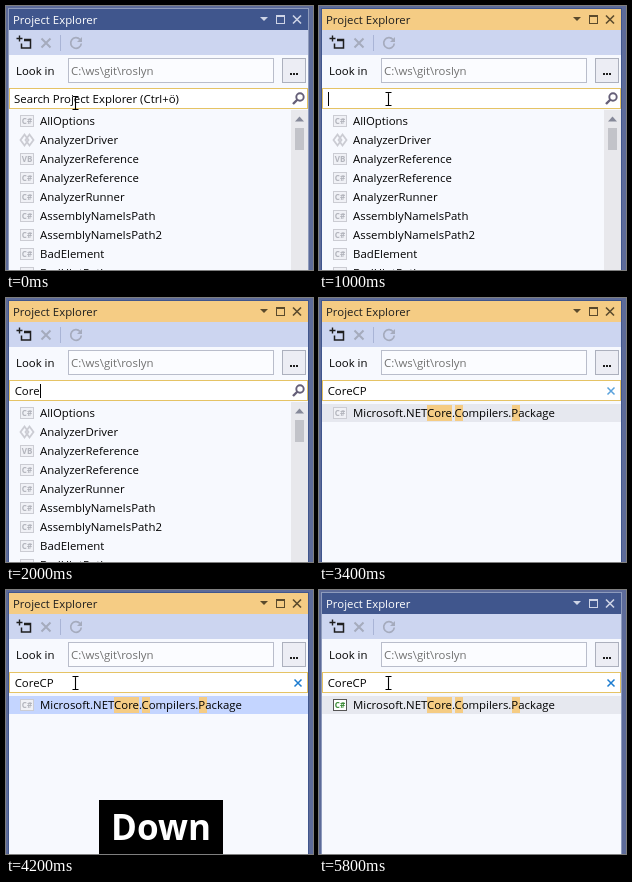
An HTML page for the animation above (6.8 s loop, 307 px wide and 264 px high).

```html
<!DOCTYPE html>
<html lang="en">
<head>
<meta charset="utf-8">
<title>Project Explorer search</title>
<style>
  html, body { margin: 0; width: 100%; height: 100%; overflow: hidden; background: #5d6b99; }
  svg { display: block; width: 100vw; height: 100vh; }
  text { font: 11.4px "Open Sans", "Noto Sans", sans-serif; fill: #000; white-space: pre; }
  .key { font-size: 35px; font-weight: 700; fill: #fff; text-anchor: middle; }
  .tag { font-size: 8px; font-weight: 700; text-anchor: middle; }
  .muted { fill: #717171; }
  .line { fill: none; stroke: #1e1e1e; }
  .off { stroke: #a5abbd; }
  .crisp { shape-rendering: crispEdges; }
</style>
</head>
<body>
<svg viewBox="0 0 307 264">
  <rect width="307" height="264" fill="#5d6b99"/>
  <rect id="frame" class="crisp" x="2" y="2" width="301" height="270"/>
  <rect id="title" class="crisp" x="3" y="3" width="299" height="21"/>
  <text id="caption" x="7" y="18">Project Explorer</text>
  <g id="buttons">
    <path d="M254 11h8l-4 4z" stroke="none"/>
    <path d="M270 9h9v9h-9zM271 11v6h7v-6z" fill-rule="evenodd" stroke="none"/>
    <path d="M287 9.5l8 8m0-8l-8 8" stroke-width="1.6"/>
  </g>

  <g class="crisp">
    <rect x="3" y="24" width="299" height="25" fill="#ccd5f0"/>
    <rect x="3" y="49" width="299" height="215" fill="#f7f9fe"/>
    <path d="M54.5 29v16" stroke="#a9b4d6"/>
  </g>
  <path class="line" d="M13.5 29.5v6M10.5 32.5h6" stroke-width="1.4"/>
  <path class="line" d="M18 33.5h6.5v8.5h-9v-4.500M18 34.500h6" stroke-width="1.5"/>
  <path class="line off" d="M35.5 32.5l9 9m0-9l-9 9" stroke-width="2"/>
  <path class="line off" d="M74 33.5a5.300 5.300 0 1 0 1.300 4" stroke-width="1.7"/>
  <path d="M71 36h5v-5z" fill="#a5abbd"/>

  <text x="10" y="69">Look in</text>
  <g class="crisp">
    <rect x="62.5" y="52.5" width="205" height="24" fill="#fbfcff" stroke="#b9bdcb"/>
    <rect x="276.5" y="52.5" width="23" height="24" fill="#ecedf4" stroke="#acb0bd"/>
    <path d="M284 67h2v2h-2zM287 67h2v2h-2zM290 67h2v2h-2z" fill="#1e1e1e"/>
  </g>
  <text class="muted" x="65" y="69">C:\ws\git\roslyn</text>

  <rect class="crisp" x="3.5" y="82.5" width="298" height="20" fill="#fff" stroke="#e5c365"/>
  <text id="hint" x="8" y="97">Search Project Explorer (Ctrl+ö)</text>
  <text id="query" x="8.7" y="97"></text>
  <rect id="caret" class="crisp" y="86" width="1" height="14" fill="#000"/>
  <g id="lens" fill="none" stroke="#655f78">
    <circle cx="294" cy="91" r="3.700" stroke-width="1.900"/>
    <path d="M291.5 93.5l-4.500 4.500" stroke-width="2.4"/>
  </g>
  <path id="clear" fill="none" d="M288.5 89.5l7 7m0-7l-7 7" stroke-width="1.5"/>

  <g id="list"></g>

  <g id="result">
    <rect id="row" class="crisp" x="3" y="106" width="299" height="18"/>
    <g class="crisp" fill="#f5cc84">
      <rect x="108" y="107" width="25" height="16"/>
      <rect x="136" y="107" width="8" height="16"/>
      <rect x="193" y="107" width="8" height="16"/>
    </g>
    <g id="dimIcon"></g>
    <g id="litIcon"></g>
    <text x="34" y="119">Microsoft.NETCore.Compilers.Package</text>
  </g>

  <g id="tip">
    <rect class="crisp" x="68.5" y="107.5" width="140" height="19" fill="#fff" stroke="#a5acc4"/>
    <text x="73" y="121">Type words to search for</text>
  </g>

  <path id="mouse" fill="none" stroke="#000" stroke-width="1.1"
    d="M-3 -6.5h2.5l.5.5.5-.5h2.5M0 -6v12M-3 6.5h2.5l.5-.5.5.5h2.5"/>

  <g id="key">
    <rect id="keyBox" class="crisp" y="210" height="54" fill="#000"/>
    <text id="keyName" class="key" x="155" y="250"></text>
  </g>
</svg>
<script>
  const LOOP = 6800;
  const QUERY = "CoreCP";
  const CARETS = [9, 16, 23, 28, 34, 41, 49];
  const ITEMS = [
    ["C#", "AllOptions"], ["", "AnalyzerDriver"], ["VB", "AnalyzerReference"],
    ["C#", "AnalyzerReference"], ["C#", "AnalyzerRunner"], ["C#", "AssemblyNameIsPath"],
    ["C#", "AssemblyNameIsPath2"], ["C#", "BadElement"], ["C#", "BadHintPath"]
  ];

  const $ = id => document.getElementById(id);
  const set = (id, attrs) => {
    for (const name in attrs) $(id).setAttribute(name, attrs[name]);
  };
  const show = (id, on) => set(id, { visibility: on ? "visible" : "hidden" });

  function icon(tag, y, edge, ink, fill) {
    if (!tag) {
      const diamond = x => `<path d="M${x} ${y - 5.5}l4 5.5-4 5.5-4-5.5z"/>`;
      return `<g fill="none" stroke="${edge}" stroke-width="1.8">${diamond(18.5)}${diamond(23.5)}</g>`;
    }
    return `<rect class="crisp" x="14.5" y="${y - 5.5}" width="13" height="11" fill="${fill}" stroke="${edge}"/>
      <text class="tag" x="21" y="${y + 3}" style="fill:${ink}">${tag}</text>`;
  }
  const dim = (tag, y) => icon(tag, y, "#cbccd3", "#b2b4bc", "#f0f1f6");

  $("list").innerHTML = ITEMS.map(([tag, name], i) => {
    const y = 115 + 19 * i;
    return dim(tag, y) + `<text x="34" y="${y + 4}">${name}</text>`;
  }).join("") + `
    <g class="crisp">
      <rect x="285" y="104" width="17" height="160" fill="#e8e8ec"/>
      <rect x="289" y="122" width="9" height="22" fill="#c2c3c9"/>
    </g>
    <path d="M289 115.5l4.5-5 4.5 5z" fill="#868999"/>`;
  $("dimIcon").innerHTML = dim("C#", 115);
  $("litIcon").innerHTML = icon("C#", 115, "#555", "#388a34", "#fff");

  function render(t) {
    const active = t >= 1000 && t < 5800;
    const found = t >= 3400;
    const typed = Math.max(0, Math.min(QUERY.length, Math.floor((t - 1200) / 200)));
    const glyph = active ? "#5a4a2c" : "#ced4e6";

    set("frame", { fill: active ? "#40568d" : "#8e9bbc" });
    set("title", { fill: active ? "#f5cc84" : "#40568d" });
    $("caption").style.fill = active ? "#1e1e1e" : "#fff";
    set("buttons", { fill: glyph, stroke: glyph });

    show("hint", t < 1000);
    $("query").textContent = QUERY.slice(0, typed);
    show("caret", t >= 1000 && t < 2600);
    set("caret", { x: CARETS[typed] });
    show("lens", !found);
    show("clear", found);
    set("clear", { stroke: t < 4200 ? "#5aa2dc" : "#1c7cd0" });

    show("list", !found);
    show("result", found);
    set("row", { fill: t >= 4200 && active ? "#c4d5ff" : "#e6e8ef" });
    show("dimIcon", found && t < 5000);
    show("litIcon", t >= 5000);

    show("tip", t >= 600 && t < 1000);
    show("mouse", t < 1400 || t >= 4200);
    set("mouse", { transform: `translate(69.5 ${t < 600 ? 97 : 93})` });

    const down = t >= 4200 && t < 5000;
    show("key", t >= 2600 && t < 3400 || t >= 4200 && t < 5800);
    set("keyBox", { x: down ? 93 : 98, width: down ? 124 : 115 });
    $("keyName").textContent = down ? "Down" : "Enter";
  }

  const start = performance.now();
  function tick() {
    render((performance.now() - start) % LOOP);
    requestAnimationFrame(tick);
  }
  tick();
</script>
</body>
</html>
```
